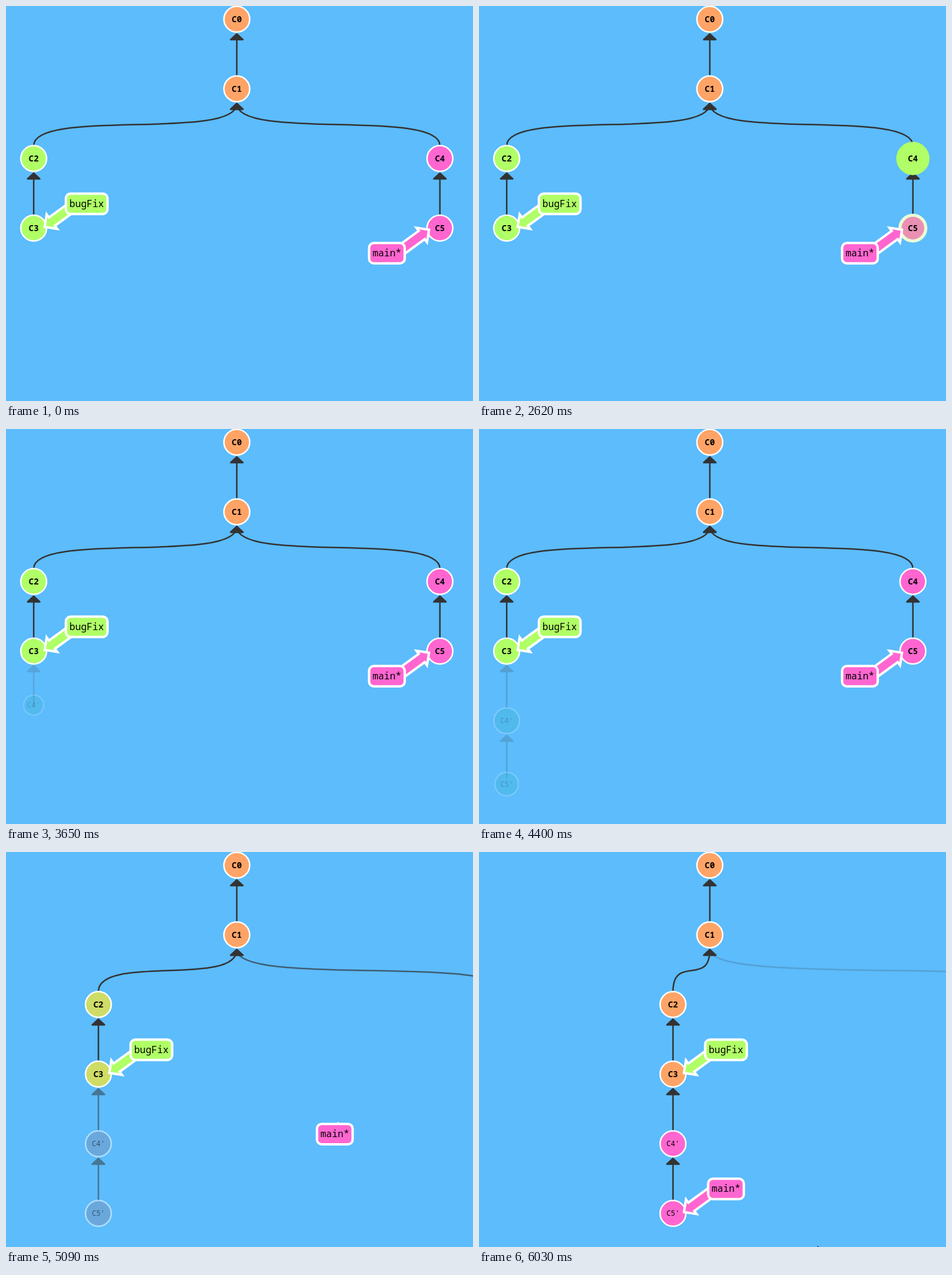
Animation, 779 px wide and 658 px high, one loop 6430 ms. Source, as an HTML page:

```html
<!DOCTYPE html>
<html lang="en">
<head>
<meta charset="utf-8">
<title>Rebase</title>
<style>
  html, body { margin: 0; width: 100%; height: 100%; overflow: hidden; background: #5cbcfc; }
  svg { display: block; width: 779px; height: 658px; }
  text { font-family: "Noto Sans Mono", "DejaVu Sans Mono", monospace; text-anchor: middle; }
</style>
</head>
<body>
<svg id="stage" viewBox="0 0 779 658">
  <g id="edges"></g>
  <g id="nodes"></g>
  <g id="labels"></g>
  <path id="cursor" d="M0 0V17L4 13.5L6.6 19L9 18L6.5 12.5H12Z" fill="#fff" stroke="#111"/>
</svg>
<script>
const LOOP = 6430;
const RADIUS = 21.5, STROKE = 2.5, FADED = 0.2, BEND = 62;
const DARK = '#333';
const WHITE = [255, 255, 255], GREEN = [176, 255, 102], PINK = [255, 102, 208],
      ORANGE = [255, 164, 102], TEAL = [36, 179, 179];
const LEFT = 46.2, RIGHT = 723.8, SHIFT = 277.4;

const $ = id => document.getElementById(id);

function add(parent, tag, attrs) {
  const el = document.createElementNS('http://www.w3.org/2000/svg', tag);
  set(el, attrs);
  parent.appendChild(el);
  return el;
}

function set(el, attrs) {
  for (const key in attrs) el.setAttribute(key, attrs[key]);
}

const clamp = v => Math.max(0, Math.min(1, v));
const lerp = (a, b, p) => a + (b - a) * p;
const mix = (a, b, p) => a.map((v, i) => lerp(v, b[i], p));
const rgb = c => `rgb(${c.map(Math.round)})`;

function easeInOut(n) {
  if (n <= 0 || n >= 1) return clamp(n);
  const q = 0.48 - n / 1.04, r = Math.sqrt(0.1734 + q * q);
  const t = Math.cbrt(r - q) + Math.cbrt(-r - q) + 0.5;
  return (1 - t) * 3 * t * t + t * t * t;
}

function bounce(n) {
  const s = 7.5625, p = 2.75;
  if (n <= 0 || n >= 1) return clamp(n);
  if (n < 1 / p) return s * n * n;
  if (n < 2 / p) return s * (n - 1.5 / p) ** 2 + 0.75;
  if (n < 2.5 / p) return s * (n - 2.25 / p) ** 2 + 0.9375;
  return s * (n - 2.625 / p) ** 2 + 0.984375;
}

// Commits

function makeNode(name, parent, row, x, fill) {
  const small = name.length > 2;
  const node = { parent, x, y: 22 + 116 * row, fill };
  if (parent) {
    const ink = { stroke: DARK, 'stroke-width': STROKE, 'stroke-linejoin': 'round' };
    node.edge = add($('edges'), 'g', {});
    node.line = add(node.edge, 'path', { fill: 'none', ...ink });
    node.head = add(node.edge, 'path', { d: 'M0 24.3L10.2 34H-10.2Z', fill: DARK, ...ink });
  }
  node.circle = add($('nodes'), 'circle', {});
  node.text = add($('nodes'), 'text', { 'font-size': small ? 12 : 14, 'font-weight': small ? 500 : 700 });
  node.text.textContent = name;
  node.baseline = small ? 4.3 : 5;
  return node;
}

const c0 = makeNode('C0', null, 0, 385, ORANGE);
const c1 = makeNode('C1', c0, 1, 385, ORANGE);
const c2 = makeNode('C2', c1, 2, LEFT, GREEN);
const c3 = makeNode('C3', c2, 3, LEFT, GREEN);
const c4 = makeNode('C4', c1, 2, RIGHT, PINK);
const c5 = makeNode('C5', c4, 3, RIGHT, PINK);
const copy4 = makeNode("C4'", c3, 4, LEFT, TEAL);
const copy5 = makeNode("C5'", copy4, 5, LEFT, TEAL);

function drawNode(node, { x = node.x, fill = node.fill, stroke = WHITE, width = STROKE, opacity = 1, grow = 1 }) {
  const y = lerp(node.y - 116, node.y, grow);
  node.at = x;
  set(node.circle, { cx: x, cy: y, r: RADIUS * grow, fill: rgb(fill), stroke: rgb(stroke), 'stroke-width': width, opacity });
  set(node.text, { x, y: y + node.baseline, opacity });
  if (!node.parent) return;

  const px = node.parent.at, top = node.parent.y + 24.7, tail = node.y - RADIUS;
  const d = Math.abs(px - x) < 1
    ? `M${x} ${tail}V${top + 5}`
    : `M${x} ${tail}C${x} ${tail - BEND} ${px} ${top + BEND} ${px} ${top}`;
  set(node.line, { d });
  set(node.head, { transform: `translate(${px} ${node.parent.y})` });
  set(node.edge, { opacity });
}

// Branch labels

function makeLabel(name, width, fill) {
  const paint = { fill: rgb(fill), stroke: '#fff', 'stroke-width': 4 };
  const arrow = add($('labels'), 'path', paint);
  const box = add($('labels'), 'g', {});
  add(box, 'rect', { x: -width / 2, y: -17, width, height: 34, rx: 8, ...paint });
  add(box, 'text', { y: 5.2, 'font-size': 16 }).textContent = name;
  return { arrow, box };
}

const ARROW = [[0, 0], [15, -15], [15, -8.5], [58, -8.5], [58, 8.5], [15, 8.5], [15, 15]];
const TILT = -36 * Math.PI / 180;

// flip runs from 1 (right of the commit) to -1 (left of it)
function drawLabel(label, x, y, tipX, tipY, flip) {
  const cos = Math.cos(TILT), sin = Math.sin(TILT);
  const points = ARROW.map(([u, v]) => {
    const w = u * flip;
    return [tipX + w * cos - v * sin, tipY + w * sin + v * cos];
  });
  set(label.arrow, { d: 'M' + points.join('L') + 'Z' });
  set(label.box, { transform: `translate(${x} ${y})` });
}

const bugFix = makeLabel('bugFix', 69.5, GREEN);
const main = makeLabel('main*', 59.5, PINK);

// Time

const steps = (t, start, size) => Math.floor((t - start) / size);

function highlight(t, start, first) {
  const k = steps(t, start, 70);
  return t >= 3300 || k < 0 ? 0 : easeInOut(first + 0.11 * k);
}

function drawCursor(t) {
  const k = Math.min(4, steps(t, 5760, 67.5));
  const p = k / 4;
  const x = (1 - p) ** 2 * 651 + 2 * p * (1 - p) * 455 + p * p * 565;
  const y = 656.5 - 17.5 * Math.sin(Math.PI * p);
  set($('cursor'), { visibility: k < 0 ? 'hidden' : 'visible', transform: `translate(${x} ${y})` });
}

function render(t) {
  const k = Math.min(30, steps(t, 3300, 2060 / 30));
  const birth4 = k < 0 ? 0 : bounce(0.0745 + 0.0825 * k);
  const birth5 = bounce(0.0825 * (k - 11.15));
  const move = easeInOut(0.162 * (k - 23.32));
  const dx = SHIFT * move;

  const leftX = LEFT + dx;
  const glow = (node, p) => drawNode(node, {
    x: RIGHT + dx,
    fill: mix(mix(PINK, GREEN, p), TEAL, move),
    stroke: mix(WHITE, GREEN, p),
    width: STROKE * (1 + 4 * p),
    opacity: lerp(1, FADED, move)
  });
  const born = (node, p) => drawNode(node, {
    x: leftX,
    fill: mix(TEAL, PINK, move),
    opacity: lerp(FADED * p, 1, move),
    grow: p
  });

  drawNode(c0, {});
  drawNode(c1, {});
  for (const node of [c2, c3]) drawNode(node, { x: leftX, fill: mix(GREEN, ORANGE, move) });
  glow(c4, highlight(t, 1650, 0.12));
  glow(c5, highlight(t, 2480, 0.14));
  born(copy4, birth4);
  born(copy5, birth5);

  drawLabel(bugFix, leftX + 88.4, 329.5, leftX + 18.3, 368, 1);
  drawLabel(main, lerp(635.4, 412, move), lerp(411.8, 561.2, move),
    lerp(705.6, 342, move), lerp(372.7, 599.8, move), lerp(-1, 1, move));
  drawCursor(t);
}

const begin = performance.now();
function frame() {
  render((performance.now() - begin) % LOOP);
  requestAnimationFrame(frame);
}
render(0);
requestAnimationFrame(frame);
</script>
</body>
</html>
```
